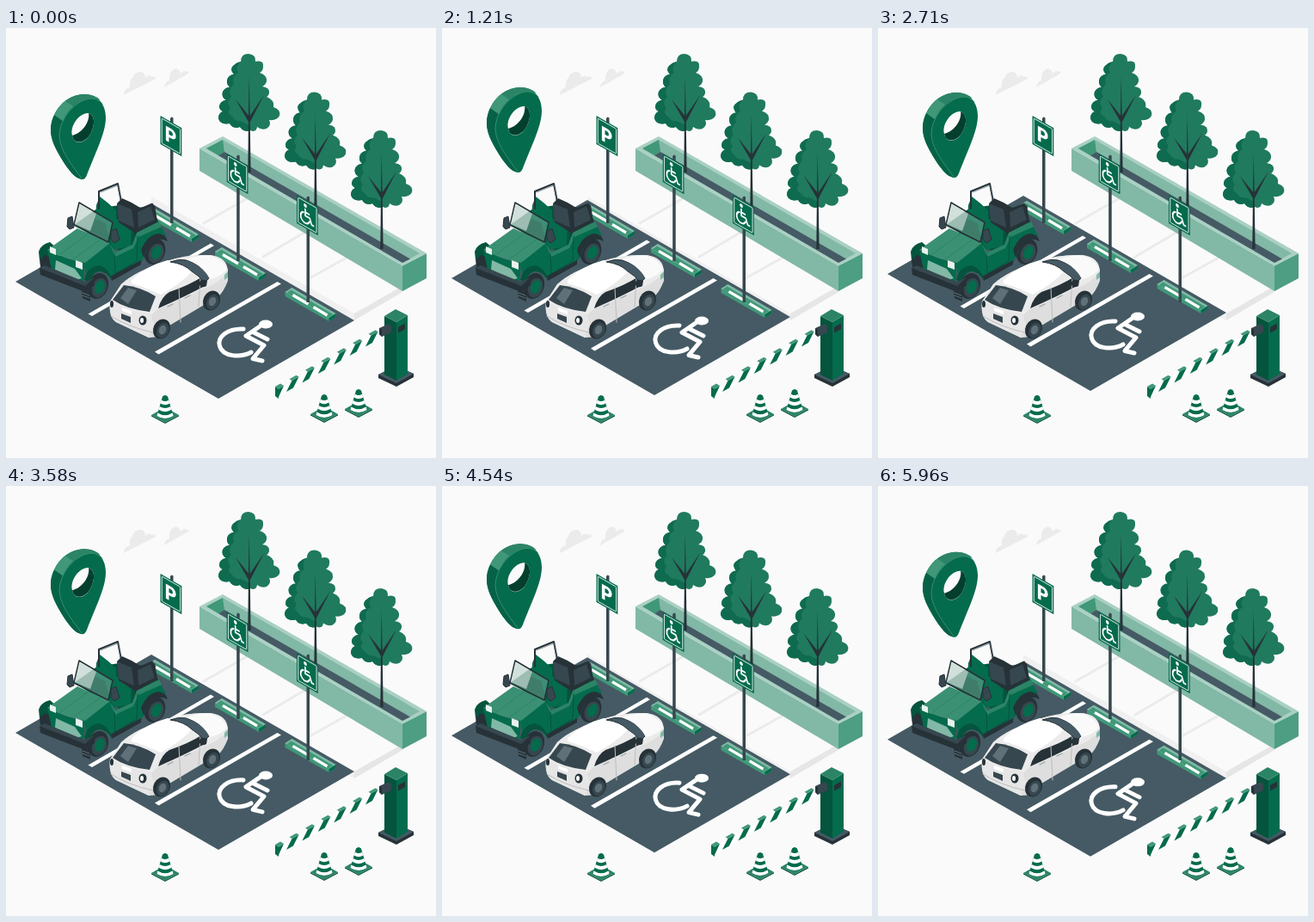
Recreate the animation shown at these times as an HTML page. Size 500x500 px, loop 6 s.

```html
<!DOCTYPE html>
<html lang="en">
<head>
<meta charset="utf-8">
<title>Isometric car park</title>
<style>
  html, body { margin: 0; width: 100%; height: 100%; overflow: hidden; background: #fafafa; }
  svg { display: block; width: 100%; height: 100%; }
  .g { fill: #056b4d; } .dg { fill: #05543d; } .mg { fill: #2c8466; } .sg { fill: #409878; }
  .lg { fill: #82b8a6; } .pg { fill: #aad0c3; }
  .ink { fill: #263238; } .slate { fill: #455a64; } .steel { fill: #37474f; }
  .grey { fill: #ebebeb; } .w { fill: #fff; }
  .line { fill: none; stroke-linecap: round; stroke-linejoin: round; }
</style>
</head>
<body>
<svg viewBox="0 0 500 500">
  <defs>
    <g id="tree">
      <path fill="#207a5e" d="M273 39Q273 30 282 30Q291 31 290 39Q300 37 299 45Q299 50 295 52Q304 55 303 62Q302 66 298 68Q307 69 306 76Q305 79 303 80Q313 84 311 92Q320 95 318 102Q315 108 306 107Q309 113 303 117Q297 119 292 115Q291 122 284 119Q277 122 272 115Q264 118 260 111Q249 113 247 105Q247 99 252 97Q246 94 249 88Q252 84 256 84Q250 80 252 74Q255 69 260 69Q255 64 258 58Q261 54 265 54Q260 48 264 44Q268 40 273 39z"/>
      <path fill="#0f6b4f" d="M265 54Q260 48 264 44Q268 40 273 39Q266 45 270 52Q262 57 265 65Q257 73 262 80Q255 87 261 93Q256 99 263 103Q266 109 273 108L283 113L284 119Q277 122 272 115Q264 118 260 111Q249 113 247 105Q247 99 252 97Q246 94 249 88Q252 84 256 84Q250 80 252 74Q255 69 260 69Q255 64 258 58Q261 54 265 54z"/>
      <path class="ink" d="M281.300 168L282 100L282.700 56L283.600 100L284.600 168z"/>
      <path class="ink" d="M282 109L267 83L283 103L300 78L284 109z"/>
    </g>
    <path id="post" class="steel" d="M11.500 3l1.500-1.500 2 1V125h-3.500z"/>
    <g id="board" transform="matrix(.87 .5 0 1 0 0)">
      <rect class="g" width="28.500" height="33"/>
      <rect x="2" y="2" width="24.500" height="29" rx="1" fill="none" stroke="#fff" stroke-width=".8"/>
    </g>
    <g id="accessSign">
      <use href="#post"/><use href="#board"/>
      <g transform="matrix(.87 .5 0 1 0 0)">
        <circle class="w" cx="11.500" cy="6.800" r="2.100"/>
        <path class="line" stroke="#fff" stroke-width="2" d="M11.500 11V18.500H17.500L20 25H22.500M12 14.500H16.500M9 15.500A6 6 0 1 0 17 23"/>
      </g>
    </g>
    <g id="stop">
      <path class="sg" d="M0 5L8 0L59 30V34L51 39L0 10z"/>
      <path class="lg" d="M0 5L8 0L59 30L51 35z"/>
      <path class="sg" d="M2 6L7 2.500L56 31L51 34.500z"/>
      <path class="g" d="M51 35L59 30V34L51 39z"/>
      <path stroke="#fff" stroke-width="3.200" d="M9 8.500L27 19M33 22.500L49 32"/>
    </g>
    <g id="cone">
      <path class="dg" d="M-16 23L0 31.500L16 23V24.500L0 33L-16 24.500z"/>
      <path class="mg" d="M-16 23L0 14L16 23L0 31.500z"/>
      <path class="g" d="M-3 1.500Q0-1.500 3 1.500L9.500 24Q0 30 -9.500 24z"/>
      <path class="w" d="M-4.200 5.500Q0 8.500 4.200 5.500L5.300 9.500Q0 13 -5.300 9.500zM-6.400 13Q0 17 6.400 13L7.500 16.800Q0 21.500 -7.500 16.800zM-8.600 20.500Q0 26 8.600 20.500L9.500 24Q0 30 -9.500 24z"/>
    </g>
    <g id="wheel">
      <ellipse class="ink" rx="10.500" ry="13" transform="rotate(25)"/>
      <ellipse class="steel" cx="2" cy="1" rx="7.500" ry="10" transform="rotate(25)"/>
    </g>
    <g id="band">
      <path class="g" d="M-8 9.500L0 5L6.500-8L-1.500-3.500z"/>
      <path class="sg" d="M-1.500-3.500L6.500-8L3.500-9.800L-4.500-5.200z"/>
    </g>
  </defs>

  <rect width="500" height="500" fill="#fafafa"/>

  <g class="grey">
    <path d="M137 78Q137 71 144 69Q143 62 147 58Q150 50 157 51Q162 52 162 58Q167 53 169 57Q174 55 174 59z"/>
    <path d="M184 69Q185 62 190 61Q189 52 195 48Q201 46 203 53Q208 48 209 51Q213 49 212 53z"/>
  </g>

  <!-- pavement -->
  <path class="line" stroke="#ebebeb" stroke-width="3" d="M230 227L284 196M299 266L350 236M353 291L405 262"/>
  <path fill="#f0f0f0" d="M169 196L405 332V340L169 204z"/>
  <path fill="#e6e6e6" d="M405 332L461 300V307L405 340z"/>

  <!-- planter -->
  <path class="lg" d="M225 140L461 276.500V306L225 166z"/>
  <path fill="#4d9e83" d="M461 276.500L489 262V291L461 306z"/>
  <path class="pg" d="M225 140L252 126L489 262L461 276.500z"/>
  <path class="lg" d="M233 140L252 130L481 262L461 273z"/>
  <path class="sg" d="M233 140L252 130L254 144L247 148.200z"/>
  <path class="slate" d="M247 148.200L254 144L470 268.500L461 273z"/>
  <use href="#tree"/><use href="#tree" x="77" y="44.500"/><use href="#tree" x="154" y="89"/>

  <g id="floor">
    <path class="slate" d="M11 295L169 204L405 340L247 431z"/>
    <path class="w" d="M95.500 332.500L238 250.500L242 253L100 335zM173 376.500L315.500 295L320 297.500L177.500 379.500z"/>
    <ellipse class="w" cx="302" cy="344.500" rx="8" ry="5"/>
    <path class="line" stroke="#fff" stroke-width="5" d="M295 347L279 358L300 369L287 384.500L298 387M288 354L304 362"/>
    <path class="line" stroke="#fff" stroke-width="5" d="M276 350C258 349 245 359 248.500 370C252 382 272 384 285 377"/>
    <use href="#stop" x="165" y="210"/>
    <use href="#stop" x="243" y="255"/>
    <use href="#stop" x="324.500" y="302"/>
  </g>

  <g transform="translate(179.500 102)">
    <use href="#post"/><use href="#board"/>
    <text transform="matrix(.87 .5 0 1 0 0)" x="14" y="25" font-family="Roboto, Arial, sans-serif" font-size="24" font-weight="900" text-anchor="middle" fill="#fff">P</text>
  </g>
  <use href="#accessSign" x="256.700" y="146"/>
  <use href="#accessSign" x="338" y="194"/>

  <!-- open off-roader -->
  <g>
    <path class="ink" d="M39 266Q42 258 52 262L58 283Q52 291 45 288Q39 282 39 266z"/>
    <path class="dg" d="M79 229L106 210L132 206L170 210L185 242L150 268L118 252z"/>
    <path class="g" d="M105 206L109 196L118 203L128 212V232L104 222z"/>
    <path class="g" d="M114 222L124 219L146 232L145 254L124 258z"/>
    <path class="ink" d="M129 204L135 198L146 203L156 209L173 206L176 225L151 239L131 226z"/>
    <path class="steel" d="M129 204L146 211L149 232L131 224zM153 214L168 207L173 223L154 232z"/>
    <path class="line" stroke="#263238" stroke-width="2" d="M108 210V190L130 181L134 202"/>
    <path class="line" stroke="#607078" stroke-width=".7" d="M110 191L130 183L133 199"/>
    <path class="line" stroke="#263238" stroke-width="2.500" d="M151 241V213L170 205L176 231"/>
    <use href="#wheel" transform="translate(173 260) scale(1.120 1.180)"/>
    <ellipse class="g" cx="175" cy="261" rx="5.500" ry="8" transform="rotate(25 175 261)"/>
    <path class="g" d="M90 272L120 250L127 261L147 252L152 239L178 227L186 241Q173 242 165 255L156 275L123 293L114 281L94 288z"/>
    <path class="mg" d="M120 250L127 261L147 252L152 238L178 225L181 231L154 243L148 256L127 266z"/>
    <path class="line" stroke="#05543d" stroke-width="1" d="M126 263L127 286M153 242L152 271L127 286"/>
    <path class="ink" d="M121 289L157 270V275L123 294z"/>
    <path class="ink" d="M157 258Q164 241 177 239Q186 240 188 248Q177 242 169 250Q163 256 160 267z"/>
    <use href="#wheel" transform="translate(107 300) scale(1.100 1.180)"/>
    <ellipse class="g" cx="109" cy="301" rx="5.500" ry="8" transform="rotate(25 109 301)"/>
    <path class="dg" d="M91 293Q94 278 108 276Q119 278 124 294Q116 282 107 283Q99 286 97 297z"/>
    <path class="dg" d="M38 260Q40 252 51 249L58 255L52 267L45 264L39 270z"/>
    <path fill="#3b9073" d="M48 258L83 233L121 250L92 273Q68 269 48 258z"/>
    <path class="line" stroke="#2c8466" stroke-width="1" d="M62 264L96 239M78 269L110 246"/>
    <path class="g" d="M48 258Q70 270 92 273L90 296L53 281z"/>
    <path class="lg" d="M58 270L80 280L88 291L82 293L57 281z"/>
    <path fill="#e7f2ed" d="M51 254L58 257V264L51 261zM81 270L89 273V281L81 278z"/>
    <path class="ink" d="M39 279L45 276L91 297L103 291V299L92 307L40 287z"/>
    <path class="steel" d="M39 279L45 276L91 295L103 290L92 300z"/>
    <path class="ink" d="M88 304L98 306V318L89 314z"/>
    <path class="line" stroke="#607078" stroke-width="1" d="M89 308L97 311M89 311L97 314"/>
    <path fill="#c6d9d2" fill-opacity=".3" stroke="#263238" stroke-width="1.500" stroke-linejoin="round" d="M85 203L124 226L119 249L79 229z"/>
    <path fill="#c6d9d2" fill-opacity=".7" d="M86 205L105 216L98 236L80 228z"/>
    <path class="steel" stroke="#263238" d="M72 221L77 219L79 232L74 234L71 231z"/>
    <path class="steel" stroke="#263238" d="M122 236L128 233L132 246L126 250L122 246z"/>
  </g>

  <!-- white car -->
  <g>
    <path fill="#dedede" d="M121 318L134 298Q150 283 187 271Q212 263 238 264Q254 268 258 282V294Q253 307 247 312L190 346Q184 360 166 360L128 342Q119 336 121 318z"/>
    <path fill="#ebebeb" d="M121 318Q140 332 169 334L176 327Q205 315 232 302Q248 296 258 284Q258 266 237 264Q209 263 187 271Q150 283 134 298z"/>
    <path fill="#e6e6e6" d="M121 317Q140 330 168 332L172 344L166 360L128 342Q119 336 121 317z"/>
    <path class="w" d="M146 293Q164 276 188 270Q207 274 216 283Q204 297 180 310Q161 301 146 297z"/>
    <path class="steel" d="M124 316L137 299Q157 301 174 312L167 330Q140 327 124 316z"/>
    <path fill="#607078" d="M133 314L142 302L152 305L142 321z"/>
    <path class="ink" d="M177 326Q181 312 190 307Q213 299 227 290L233 299Q207 313 177 326z"/>
    <path class="line" stroke="#bdbdbd" stroke-width="1" d="M201 302L203 342M226 291L224 324"/>
    <path class="slate" stroke="#263238" stroke-width="1" d="M191 272Q201 268 210 270Q229 276 237 290L231 296Q223 287 216 283Q207 274 191 272z"/>
    <path fill="#fafafa" d="M209 269Q225 263 239 265Q254 270 257 281Q249 290 237 292Q229 276 209 269z"/>
    <path class="lg" d="M254 287L258 283V290L254 293z"/>
    <path class="ink" d="M225 295Q229 291 234 294L233 300Q228 303 225 299z"/>
    <path class="line" stroke="#9aa2a6" stroke-width="1.200" d="M188 324L194 321M208 314L214 311"/>
    <path class="line" stroke="#bdbdbd" stroke-width="1" d="M122 335Q143 348 171 354"/>
    <path class="w" d="M135 325L146 329V333L135 329z"/>
    <path class="steel" d="M134 332L145 336V343L134 338z"/>
    <ellipse class="ink" cx="159" cy="340" rx="4.500" ry="5.500"/>
    <ellipse class="w" cx="158" cy="340" rx="2" ry="3"/>
    <ellipse class="ink" cx="123" cy="321" rx="2" ry="4"/>
    <use href="#wheel" transform="translate(181 350) scale(.920)"/>
    <use href="#wheel" transform="translate(239 317) scale(.920)"/>
    <ellipse fill="#607078" cx="182" cy="351" rx="4" ry="5.500" transform="rotate(25 182 351)"/>
    <ellipse fill="#607078" cx="240" cy="318" rx="4" ry="5.500" transform="rotate(25 240 318)"/>
  </g>

  <g id="pin">
    <path class="g" fill-rule="evenodd" d="M89 176C82 175 77 171 67 156C57 140 52 130 52 118C53 97 70 77 91 77C106 77 116 88 116 104C116 122 104 145 94 171Q92 176 89 176zM77 125C74 113 86 98 96 99C105 102 103 116 97 125C91 135 79 136 77 125z"/>
    <path fill="#066246" d="M89 176C82 175 77 171 67 156C57 140 52 130 52 118Q52 109 56 101L66 108Q62 117 62 126C63 142 78 162 89 176z"/>
    <path class="mg" d="M56 101C63 86 76 77 91 77Q103 77 110 84Q103 81 96 82C83 85 72 95 66 108z"/>
    <path class="sg" d="M56 101Q61 91 69 85L78 91Q70 98 66 108z"/>
    <path class="line" stroke="#409878" stroke-width=".8" d="M88 175C77 160 63 143 62 126C62 104 82 83 99 82Q107 82 112 88"/>
    <path fill="#043f2e" d="M77 125C79 136 91 134 97 125C103 116 105 102 96 99C98 107 90 122 77 125z"/>
  </g>

  <!-- barrier -->
  <path class="ink" d="M433 403L453 393L474 402V406L454 417L433 407z"/>
  <path class="slate" d="M433 403L453 393L474 402L454 413z"/>
  <path class="dg" d="M440 335L454 342V410L440 403z"/>
  <path class="g" d="M454 342L467 334V402L454 410z"/>
  <path class="mg" d="M440 335L453 327L467 334L454 342z"/>
  <path class="ink" d="M456 348L464 343.500V350L456 354.500z"/>
  <path class="w" d="M317 420L440 349V357L317 429z"/>
  <path class="g" d="M313 417L317 419.500L323 416L317 429V431L313 428z"/>
  <path class="sg" d="M313 417L319 413.500L323 416L317 419.500z"/>
  <g id="bands"></g>
  <path class="steel" d="M434 349L445 344L448 347V354L437 359L434 356z"/>
  <path class="ink" d="M434 349L437 351V359L434 356z"/>

  <use href="#cone" x="185" y="427"/>
  <use href="#cone" x="370" y="426"/>
  <use href="#cone" x="410" y="420"/>
</svg>
<script>
  const byId = id => document.getElementById(id);

  byId('bands').innerHTML = Array.from({ length: 6 }, (_, i) =>
    `<use href="#band" x="${334 + 18.4 * i}" y="${413.5 - 10.5 * i}"/>`).join('');

  // Linear rise and fall, 10 px high
  const lift = (t, period) => -10 * (1 - Math.abs(1 - 2 * (t % period) / period));
  const shift = (id, y) => byId(id).setAttribute('transform', `translate(0 ${y.toFixed(2)})`);

  function draw(t) {
    shift('floor', lift(t, 6000));
    shift('pin', lift(t, 3000));
  }

  let start;
  function tick(now) {
    start ??= now;
    draw(now - start);
    requestAnimationFrame(tick);
  }
  draw(0);
  requestAnimationFrame(tick);
</script>
</body>
</html>
```
